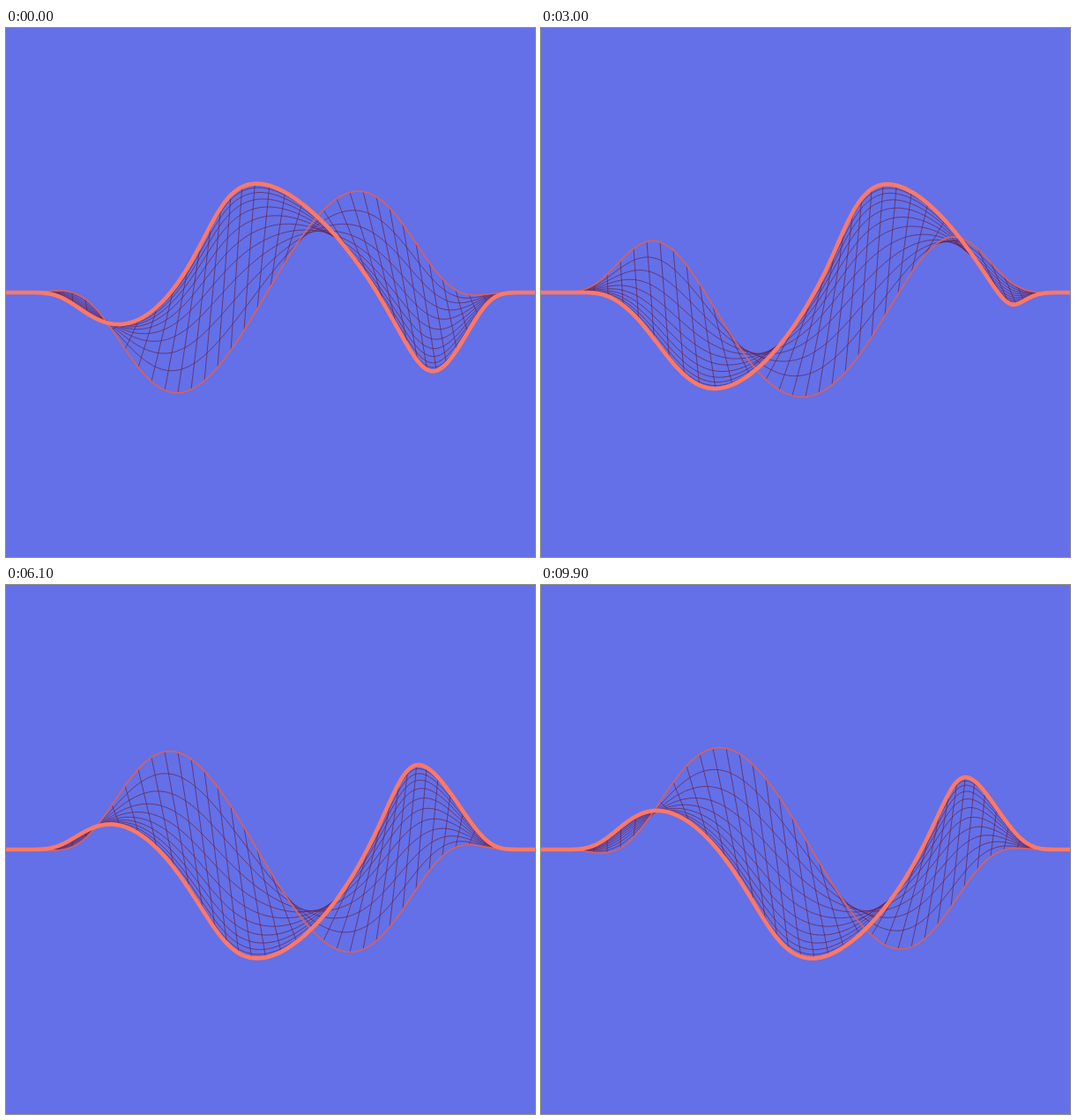
Write an HTML page with a canvas that moves like this. It is 600 px wide and 600 px high and loops after 10 s.

```html
<!DOCTYPE html>
<html>
<head>
<meta charset="utf-8">
<title>Wave ribbon</title>
<style>
  html, body { margin: 0; width: 100%; height: 100%; overflow: hidden; background: #6370e8; }
  canvas { display: block; width: 600px; height: 600px; }
</style>
</head>
<body>
<canvas id="stage" width="600" height="600"></canvas>
<script>
const ctx = document.getElementById('stage').getContext('2d');
const LOOP = 10000, STEP = 100, PERIOD = 4000;
const WAVELENGTH = 440, LEAD = 0.305;
const STRANDS = 12, RIB_GAP = 15;

// Flat-topped bump that fades to zero 290px from its center
function bump(u, center) {
  const d = Math.abs(u - center) / 290;
  return d < 1 ? (1 - d ** 5) ** 5.4 : 0;
}

const wave = (u, t, lead) =>
  Math.sin(2 * Math.PI * ((u - 296) / WAVELENGTH + t / PERIOD + lead));

function thinEdge(u, t) {
  return [u, 300 - 118.5 * bump(u, 299) * wave(u, t, 0)];
}

// The bold edge runs ahead and is pushed sideways, so its bends lean left
function boldEdge(u, t) {
  const w = wave(u, t, LEAD);
  const push = 39 + 0.05 * Math.min(0, u - 285) - 20 * w * w - 6 * w;
  return [u + bump(u, 322) * push, 300 - 123.5 * bump(u, 308) * w];
}

// Point on the ribbon: s = 0 is the thin edge, s = 1 the bold edge
function point(u, s, t) {
  const [ax, ay] = thinEdge(u, t);
  const [bx, by] = boldEdge(u, t);
  return [ax + (bx - ax) * s, ay + (by - ay) * s];
}

function strand(s, t) {
  for (let u = -10; u <= 610; u += 2) {
    const p = point(u, s, t);
    u === -10 ? ctx.moveTo(...p) : ctx.lineTo(...p);
  }
}

function stroke(color, width, trace) {
  ctx.beginPath();
  trace();
  ctx.strokeStyle = color;
  ctx.lineWidth = width;
  ctx.stroke();
}

function draw(t) {
  ctx.fillStyle = '#6370e8';
  ctx.fillRect(0, 0, 600, 600);
  ctx.lineJoin = 'round';

  stroke('rgba(104, 32, 72, 0.8)', 0.9, () => {
    for (let j = 1; j < STRANDS; j++) strand(1 - (1 - j / STRANDS) ** 2, t);
    for (let u = RIB_GAP * 2; u < 580; u += RIB_GAP) {
      ctx.moveTo(...point(u, 0, t));
      ctx.lineTo(...point(u, 1, t));
    }
  });
  stroke('#d9605c', 1.7, () => strand(0, t));
  stroke('#ff7866', 4.6, () => strand(1, t));
}

function frame(now) {
  draw(Math.floor((now % LOOP) / STEP) * STEP);
  requestAnimationFrame(frame);
}
requestAnimationFrame(frame);
</script>
</body>
</html>
```
